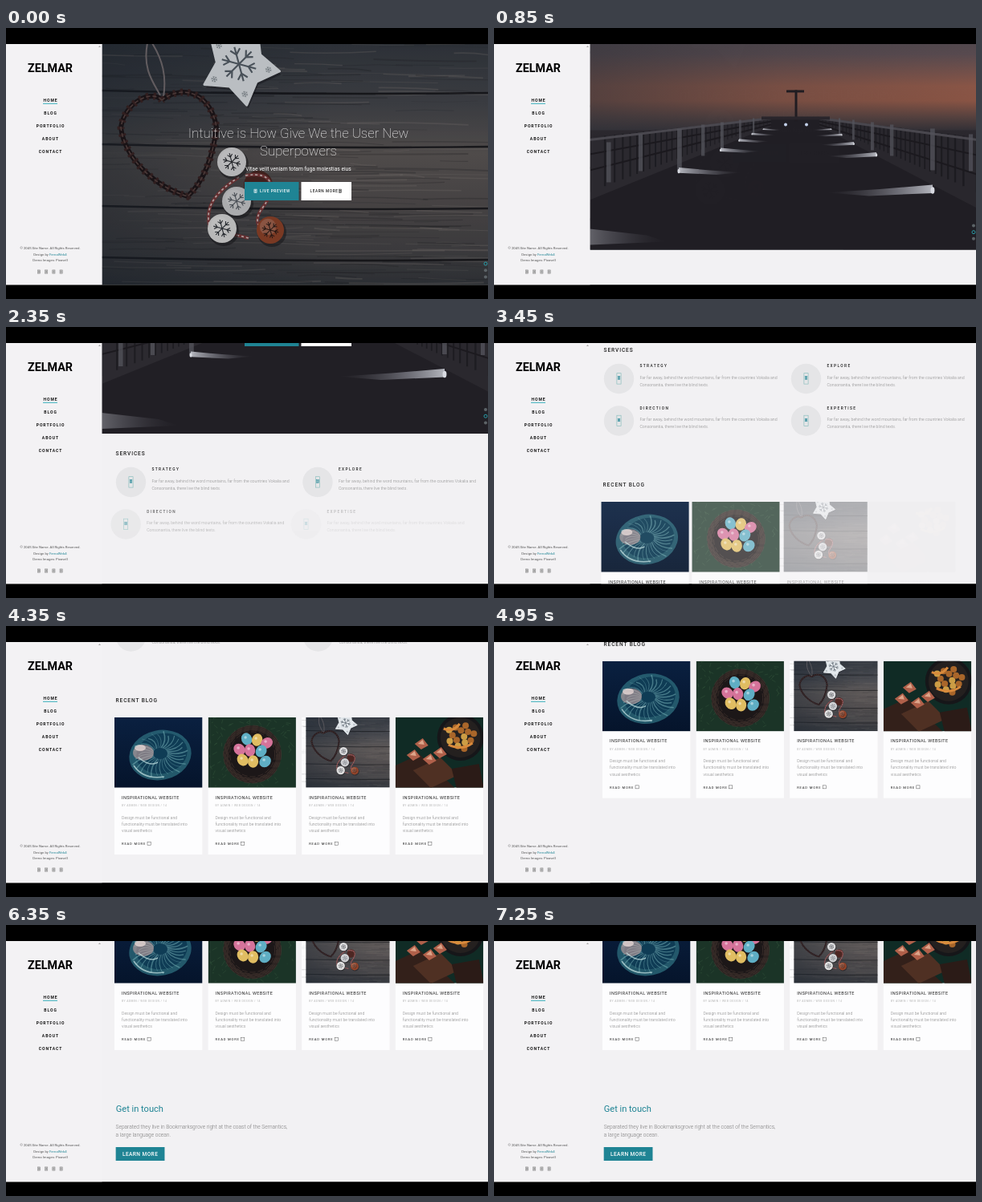
Recreate the animation shown at these times as an HTML page. Size 600 by 338 pixels, loop 7.3 s.

```html
<!DOCTYPE html>
<html lang="en">
<head>
<meta charset="utf-8">
<title>Scrolling website preview</title>
<style>
html, body { margin: 0; width: 100%; height: 100%; overflow: hidden; background: #000; }
svg { display: block; width: 100vw; height: 100vh; font-family: Roboto, Arial, sans-serif; }
</style>
</head>
<body>
<svg id="stage" viewBox="0 0 600 338"></svg>
<script>
const LOOP = 7300;
const TEAL = '#1f8494';
const stage = document.getElementById('stage');

// Drawing helpers
const text = (x, y, size, str, o = {}) =>
  `<text x="${x}" y="${y}" font-size="${size}" font-weight="${o.w || 400}" fill="${o.fill || '#222'}"` +
  ` letter-spacing="${o.ls || 0}" text-anchor="${o.mid ? 'middle' : 'start'}">${str}</text>`;
const rect = (x, y, w, h, fill, extra = '') =>
  `<rect x="${x}" y="${y}" width="${w}" height="${h}" fill="${fill}" ${extra}/>`;
const circle = (x, y, r, fill, extra = '') => `<circle cx="${x}" cy="${y}" r="${r}" fill="${fill}" ${extra}/>`;
const ellipse = (x, y, rx, ry, fill, extra = '') =>
  `<ellipse cx="${x}" cy="${y}" rx="${rx}" ry="${ry}" fill="${fill}" ${extra}/>`;
const path = (d, stroke, width, extra = '') =>
  `<path d="${d}" fill="none" stroke="${stroke}" stroke-width="${width}" ${extra}/>`;
const poly = (points, fill, extra = '') => `<polygon points="${points}" fill="${fill}" ${extra}/>`;
const repeat = (n, fn) => Array.from({ length: n }, (_, i) => fn(i)).join('');
const gradient = (id, stops, dir = 'x2="0" y2="1"') =>
  `<linearGradient id="${id}" x1="0" y1="0" ${dir}>` +
  stops.map(([at, c, a = 1]) => `<stop offset="${at}" stop-color="${c}" stop-opacity="${a}"/>`).join('') +
  '</linearGradient>';
const glyph = (x, y, w, h, color) =>
  rect(x - w / 2, y - h / 2, w, h, color, `fill-opacity=".25" stroke="${color}" stroke-width=".5"`) +
  path(`M${x - w / 4} ${y - h / 5}h${w / 2}M${x - w / 4} ${y + h / 5}h${w / 2}`, color, 0.9);

let seed = 7;
const rand = (a = 0, b = 1) => {
  seed = (seed * 16807) % 2147483647;
  return a + (b - a) * seed / 2147483647;
};

function snowflake(x, y, r, color) {
  return repeat(6, i =>
    `<g transform="translate(${x} ${y}) rotate(${i * 60 + 15})">` +
    path(`M0 0H${r}M${r * .55} 0l${r * .3} ${r * .28}M${r * .55} 0l${r * .3} ${-r * .28}`, color, r * .1) + '</g>');
}

function woodPhoto() {
  const star = Array.from({ length: 10 }, (_, i) => {
    const a = (80 + i * 36) * Math.PI / 180, r = i % 2 ? 29 : 50;
    return `${(291 + r * Math.cos(a)).toFixed(1)},${(47 + r * Math.sin(a)).toFixed(1)}`;
  }).join(' ');
  const heart = 'M194 90C182 76 148 92 143 124C148 164 186 198 226 210C246 192 258 160 262 124C256 84 222 68 194 90';
  const ribbon = 'M298 184C334 178 338 200 318 226C300 252 336 268 345 250M290 186C262 204 246 222 254 250L302 262';
  const bell = (x, y, r, fill, mark) =>
    circle(x + 2, y + 3, r + 1, '#17161a', 'opacity=".5"') + circle(x, y, r, fill) +
    circle(x - 3, y - 4, r * .6, '#fff', 'opacity=".18"') + snowflake(x, y, r * .62, mark);
  return rect(119, 19, 482, 306, 'url(#woodTone)') +
    repeat(260, () => {
      const x = rand(90, 560), y = rand(20, 324), l = rand(30, 170);
      return path(`M${x} ${y}q${l / 2} ${rand(-3, 3)} ${l} ${rand(-1, 3)}`,
        rand() < .6 ? '#1f2126' : '#8f8883', rand(.4, 2), 'opacity=".26"');
    }) +
    [78, 145, 222, 286].map(y => path(`M119 ${y}q240 6 482 3`, '#141519', 2.6, 'opacity=".85"')).join('') +
    rect(119, 19, 482, 306, 'url(#woodShade)') +
    path('M176 19C170 50 182 66 192 84M182 19C195 40 200 60 196 86', '#777074', 2) +
    path(heart, '#1f171b', 6) + path(heart, '#3a2526', 9, 'stroke-dasharray="3 6"') +
    path(heart, '#5c4745', 1.5, 'stroke-dasharray="5 3"') +
    poly(star, '#15161b', 'opacity=".45" transform="translate(2 4)"') +
    poly(star, '#e3e8ec', 'stroke="#e3e8ec" stroke-width="3" stroke-linejoin="round"') +
    snowflake(290, 45, 22, '#59636d') +
    [36, 108, 180, 252, 324].map(a => snowflake(291 + 36 * Math.cos((a + 44) * Math.PI / 180),
      47 + 36 * Math.sin((a + 44) * Math.PI / 180), 4, '#59636d')).join('') +
    circle(314, 196, 18, '#4d2723') +
    path(ribbon, '#7d3b3d', 4) + path(ribbon, '#d8cac8', 1.6, 'stroke-dasharray="3 3"') +
    bell(281, 167, 18, '#dcdcde', '#2a2c32') + bell(287, 216, 18, '#cfd0d3', '#5a6068') +
    bell(269, 250, 18, '#e0e0e0', '#30343a') + bell(329, 252, 17, '#94452b', '#2d1c18');
}

function pierPhoto() {
  const rails = [[140, 190, 240], [180, 180, 226], [228, 173, 225], [258, 168, 207], [282, 165, 200], [305, 162, 187], [322, 160, 180]];
  const post = (x, a, b) => rect(x, a, Math.max(2, (b - a) / 9), b - a, '#55545c', 'opacity=".75"');
  const streak = (x, y, w, h, dir) =>
    poly(`${x},${y - h} ${x + dir * w * .5},${y - h * .2} ${x + dir * w},${y + h * .4} ${x + dir * w * .6},${y + h} ${x},${y + h * .5}`,
      `url(#${dir > 0 ? 'beamR' : 'beamL'})`) + ellipse(x, y, h * .35, h * .6, '#d9dbe2');
  return rect(119, 19, 482, 306, 'url(#dusk)') + rect(119, 19, 482, 158, 'url(#duskShade)') +
    rect(119, 175, 482, 150, 'url(#deck)') +
    poly('119,184 345,160 405,160 601,184 601,325 119,325', '#211f25') +
    poly('119,184 345,160 345,170 119,262', '#2c2a30') + poly('601,184 405,160 405,170 601,272', '#2a282e') +
    repeat(34, i => {
      const k = (i / 34) ** .7, top = 184 - 24 * k, drop = (1 - k) * 62 + 6;
      return path(`M${119 + 226 * k} ${top}v${drop}M${601 - 196 * k} ${top}v${drop}`, '#151419', 2.5 - 2 * k, 'opacity=".6"');
    }) +
    path('M119 187L345 160M601 187L405 160', '#4a484f', 3) +
    path('M119 205L345 164M119 225L345 168M601 206L405 164M601 230L405 168', '#1c1a1f', 2) +
    rails.map(([x, a, b]) => post(x, a, b) + post(751 - x + (x < 230 ? 20 : 0), a, b)).join('') +
    rect(374.5, 125, 3, 39, '#211d22') + rect(364, 125, 22, 3, '#211d22') + rect(333, 158, 85, 4, '#2a262c') +
    streak(230, 226, 78, 4.5, 1) + streak(546, 250, 132, 7, -1) +
    streak(282, 200, 50, 3, 1) + streak(476, 206, 62, 3.5, -1) +
    streak(305, 188, 38, 2.2, 1) + streak(448, 192, 42, 2.5, -1) +
    streak(321, 180, 30, 1.8, 1) + streak(433, 181, 34, 1.8, -1) +
    streak(335, 174, 24, 1.3, 1) + streak(420, 174, 24, 1.3, -1) +
    circle(363, 168, 2, '#c4d2ec') + circle(389, 168, 2, '#c4d2ec') +
    poly('119,298 190,306 215,314 119,318', 'url(#beamR)', 'opacity=".45"');
}

function jellyPhoto() {
  return rect(0, 0, 110, 88, 'url(#sea)') +
    ellipse(57, 47, 39, 31, '#2f7483', 'transform="rotate(-12 57 47)" opacity=".7"') +
    ellipse(59, 45, 32, 25, '#0f3c55', 'transform="rotate(-12 59 45)"') +
    repeat(30, i => {
      const a = i / 30 * 2 * Math.PI, r = rand(.7, 1);
      return path(`M${57 + 9 * Math.cos(a)} ${45 + 7 * Math.sin(a)}Q${57 + 22 * Math.cos(a + .3)} ${46 + 18 * Math.sin(a + .3)} ` +
        `${57 + 38 * r * Math.cos(a)} ${47 + 30 * r * Math.sin(a)}`, '#8bc5c8', rand(.5, 1.6), 'opacity=".45"');
    }) +
    ellipse(36, 44, 13, 10, '#c9a5a4', 'opacity=".6"') + ellipse(32, 38, 7, 4, '#f2e2df', 'opacity=".7"') +
    path('M24 60Q36 78 62 74M30 50Q44 62 54 56', '#c8e6e6', 1.6, 'opacity=".7"');
}

function nestPhoto() {
  const eggs = [[48, 27, 0], [61, 28, 2], [73, 32, 1], [39, 40, 1], [66, 42, 0],
    [52, 41, 1], [71, 55, 0], [43, 53, 2], [56, 55, 2]];
  const dyes = ['#5faec4', '#d5739a', '#e0bd62'];
  return rect(0, 0, 110, 88, '#1b3427') +
    repeat(110, () => path(`M${rand(0, 106)} ${rand(0, 86)}l${rand(-6, 6)} ${rand(-6, 6)}`, '#426747', .7, 'opacity=".45"')) +
    circle(55, 46, 36, '#2d2422') + circle(55, 46, 30, '#1c1718') +
    repeat(5, i => circle(55, 46, 28 + i * 2, 'none', 'stroke="#4a3a33" stroke-width=".6" stroke-dasharray="7 3"')) +
    eggs.map(([x, y, c]) => ellipse(x, y, 6.6, 7.8, dyes[c], `transform="rotate(${x * 3 - 165} ${x} ${y})"`) +
      circle(x - 1.5, y - 2, 1.8, '#fff', 'opacity=".45"')).join('');
}

function feastPhoto() {
  return rect(0, 0, 110, 88, '#102b25') +
    poly('0,60 30,46 74,88 0,88', '#33201a') + poly('22,66 56,50 78,72 44,88', '#4f3023') + poly('70,64 104,58 110,88 76,88', '#2b1b17') +
    circle(81, 25, 29, '#161619') + circle(81, 25, 25, '#24201f') +
    repeat(14, i => {
      const r = 17 * Math.sqrt((i + 1) / 14);
      return circle(81 + r * Math.cos(i * 2.4), 24 + r * Math.sin(i * 2.4), 4, i % 3 ? '#a9662a' : '#cc9d45');
    }) +
    [[32, 33], [22, 47], [42, 52], [55, 44]].map(([x, y]) =>
      poly(`${x - 8},${y} ${x + 2},${y - 7} ${x + 9},${y + 2} ${x},${y + 7}`, '#b0604a') +
      poly(`${x - 4},${y} ${x + 2},${y - 5} ${x + 4},${y + 1}`, '#dda58a')).join('') +
    path('M60 14q12 5 20 -6M66 34q16 8 30 -2', '#d98a3c', 3);
}

// Elements that slide in from the left; each has its own start time
const entrances = [];
const enter = (start, body) => {
  entrances.push(start);
  return `<g class="enter" opacity="0">${body}</g>`;
};

function buttons(y) {
  return rect(297, y, 67.5, 23, TEAL) + rect(367.5, y, 62.5, 23, '#fff') +
    glyph(310.5, y + 11.3, 3.2, 4.4, '#fff') + text(316, y + 13.1, 4.8, 'LIVE PREVIEW', { w: 500, ls: .55, fill: '#fff' }) +
    text(378.5, y + 13.1, 4.8, 'LEARN MORE', { w: 500, ls: .58 }) + glyph(416, y + 11.3, 3.2, 4.4, '#333');
}

function slideText() {
  const white = { w: 100, fill: '#fff', mid: true };
  return text(364, 137, 16.8, 'Intuitive is How Give We the User New', white) +
    text(364, 158.5, 16.8, 'Superpowers', white) +
    text(364, 178, 6.7, 'Vitae velit veniam totam fuga molestias eius', { ...white, w: 400 }) + buttons(192);
}

function service(x, y, title, start) {
  const soft = { w: 300, fill: '#888' };
  return enter(start, circle(x, y, 18.7, '#e5e5e7') +
    rect(x - 2.6, y - 6.8, 5.2, 13.4, 'none', 'stroke="#7fb9b8" stroke-width=".6"') + glyph(x, y - 1, 2.6, 3.6, TEAL) +
    text(x + 26, y - 14.2, 4.8, title, { w: 500, ls: 1.4 }) +
    text(x + 26, y + .4, 5.2, 'Far far away, behind the word mountains, far from the countries Vokalia and', soft) +
    text(x + 26, y + 9, 5.2, 'Consonantia, there live the blind texts.', soft));
}

function card(i, photo) {
  const x = 135 + i * 116.6, soft = { w: 300, fill: '#808080' };
  return enter(2800 + i * 210, `<g transform="translate(${x} 538)">` +
    rect(0, 0, 109.3, 171, '#fdfdfe') +
    `<g clip-path="url(#photoBox)">${photo}</g>` +
    text(9, 101.7, 5.5, 'INSPIRATIONAL WEBSITE', { ls: .4 }) +
    text(9, 111.3, 3.4, 'BY ADMIN / WEB DESIGN / 14', { fill: '#b4b4b4', ls: .42 }) +
    ['Design must be functional and', 'functionality must be translated into', 'visual aesthetics']
      .map((line, n) => text(9, 126.5 + n * 8.3, 5.2, line, soft)).join('') +
    text(9, 159.2, 4.2, 'READ MORE', { ls: .8 }) +
    rect(41, 155.2, 4.2, 4, 'none', 'stroke="#555" stroke-width=".5"') + '</g>');
}

function sidebar() {
  const items = ['HOME', 'BLOG', 'PORTFOLIO', 'ABOUT', 'CONTACT'];
  const small = { fill: '#555', mid: true };
  const credit = name => `<tspan fill="${TEAL}">${name}</tspan>`;
  return rect(0, 19, 119.5, 303, '#f3f2f4') +
    poly('115,24 118,24 116.5,22', '#aaa') +
    text(55, 55, 14.3, 'ZELMAR', { w: 700, fill: '#000', mid: true }) +
    items.map((name, i) => text(55.5, 92.4 + i * 15.8, 5, name, { w: 700, ls: 1, mid: true, fill: '#111' })).join('') +
    rect(46, 93.8, 18, 1, '#35aebb') +
    text(55, 276.2, 4.3, '© 2045 Site Name. All Rights Reserved.', small) +
    text(55, 283.5, 4.3, 'Design by ' + credit('FernoWeb4'), small) +
    text(55, 290.7, 4.3, 'Demo Images: Pixovell', small) +
    repeat(4, i => glyph(41 + i * 9.2, 304, 3.2, 4.2, '#777'));
}

function page() {
  const heading = { w: 500, ls: .9 };
  const lead = { w: 300, fill: '#777' };
  const overlay = rect(119, 19, 482, 306, '#000', 'opacity=".18"');
  return `<g clip-path="url(#hero)"><use href="#wood"/>${overlay}${slideText()}` +
    `<g id="slide2">${pierPhoto()}<g id="slide2Text">${slideText()}</g></g></g>` +
    repeat(3, i => circle(597, 294 + i * 8.2, 2, '#5d6468', 'class="dot"')) +
    enter(1250, text(136.5, 351, 6.6, 'SERVICES', heading)) +
    service(155.5, 384.5, 'STRATEGY', 1380) + service(388.5, 384.5, 'EXPLORE', 1560) +
    service(155.5, 437, 'DIRECTION', 1950) + service(388.5, 437, 'EXPERTISE', 2170) +
    enter(2720, text(136.5, 519.4, 6.6, 'RECENT BLOG', heading)) +
    card(0, jellyPhoto()) + card(1, nestPhoto()) +
    card(2, '<use href="#wood" transform="translate(-29 -6) scale(.288)"/>') + card(3, feastPhoto()) +
    enter(5280, text(136.7, 786, 11.1, 'Get in touch', { fill: TEAL })) +
    enter(5430, text(136.7, 807, 6.6, 'Separated they live in Bookmarksgrove right at the coast of the Semantics,', lead) +
      text(136.7, 817, 6.6, 'a large language ocean.', lead)) +
    enter(5410, rect(136.7, 830, 60.8, 17, TEAL) + text(145, 840.8, 6.6, 'LEARN MORE', { w: 500, ls: .4, fill: '#fff' }));
}

stage.innerHTML = `<defs>
${gradient('woodTone', [[0, '#363b43'], [.25, '#47494f'], [.45, '#605b5a'], [.65, '#555152'], [.85, '#474649'], [1, '#33373d']])}
${gradient('woodShade', [[0, '#1c2530', .45], [.6, '#1c2530', 0]], 'x2="1" y2="0"')}
${gradient('dusk', [[0, '#3d4149'], [.2, '#594b50'], [.33, '#8a5647'], [.39, '#8a5545'], [.46, '#54413f'], [.51, '#343137']])}
${gradient('duskShade', [[0, '#33343b', .6], [.5, '#33343b', .2], [1, '#33343b', 0]], 'x2="1" y2="0"')}
${gradient('deck', [[0, '#2d2a30'], [.25, '#1f1d22'], [1, '#232026']])}
${gradient('sea', [[0, '#0a2040'], [1, '#05142b']])}
${gradient('beamR', [[0, '#c4c6ce', .9], [.4, '#8d8e98', .6], [1, '#4a4950', 0]], 'x2="1" y2="0"')}
${gradient('beamL', [[0, '#4a4950', 0], [.6, '#8d8e98', .6], [1, '#c4c6ce', .9]], 'x2="1" y2="0"')}
<clipPath id="view"><rect x="0" y="20" width="600" height="300.3"/></clipPath>
<clipPath id="hero"><rect x="119.5" y="19" width="481" height="305"/></clipPath>
<clipPath id="photoBox"><rect width="109.3" height="87.5"/></clipPath>
<g id="wood">${woodPhoto()}</g></defs>
<rect width="600" height="338"/>
<g clip-path="url(#view)">${rect(0, 19, 600, 303, '#f2f1f3')}<g id="page">${page()}</g>${sidebar()}</g>`;

const pageEl = document.getElementById('page');
const slide2 = document.getElementById('slide2');
const slide2Text = document.getElementById('slide2Text');
const dots = document.querySelectorAll('.dot');
const enterEls = document.querySelectorAll('.enter');

const clamp = v => Math.min(1, Math.max(0, v));

// CSS "ease": cubic-bezier(.25, .1, .25, 1)
function ease(x) {
  if (x <= 0 || x >= 1) return clamp(x);
  const bez = (u, a, b) => 3 * u * (1 - u) ** 2 * a + 3 * u * u * (1 - u) * b + u ** 3;
  let lo = 0, hi = 1;
  for (let i = 0; i < 20; i++) {
    const u = (lo + hi) / 2;
    if (bez(u, .25, .25) < x) lo = u; else hi = u;
  }
  return bez(lo, .1, 1);
}

const SCROLL = [[450, 0], [1350, 107], [2350, 191], [3450, 320], [4350, 424], [5450, 553]];
function scrollAt(t) {
  if (t <= SCROLL[0][0]) return 0;
  for (let i = 1; i < SCROLL.length; i++) {
    const [t0, y0] = SCROLL[i - 1], [t1, y1] = SCROLL[i];
    if (t <= t1) return y0 + (y1 - y0) * (t - t0) / (t1 - t0);
  }
  return SCROLL[SCROLL.length - 1][1];
}

function update(t) {
  pageEl.setAttribute('transform', `translate(0 ${-scrollAt(t)})`);
  slide2.setAttribute('opacity', ease((t - 300) / 600));
  const rise = ease((t - 1600) / 700);
  slide2Text.setAttribute('opacity', rise);
  slide2Text.setAttribute('transform', `translate(0 ${20 * (1 - rise)})`);
  const active = t < 300 ? 0 : 1;
  dots.forEach((dot, i) => {
    dot.setAttribute('fill', i === active ? 'none' : '#5d6468');
    dot.setAttribute('stroke', i === active ? '#2a9aa5' : 'none');
  });
  enterEls.forEach((el, i) => {
    const p = ease((t - entrances[i]) / 1000);
    el.setAttribute('opacity', p);
    el.setAttribute('transform', `translate(${-20 * (1 - p)} 0)`);
  });
}

const begin = performance.now();
function tick() {
  const t = (performance.now() - begin) % LOOP;
  update(Math.floor(t / 50) * 50);
  requestAnimationFrame(tick);
}
update(0);
requestAnimationFrame(tick);
</script>
</body>
</html>
```
